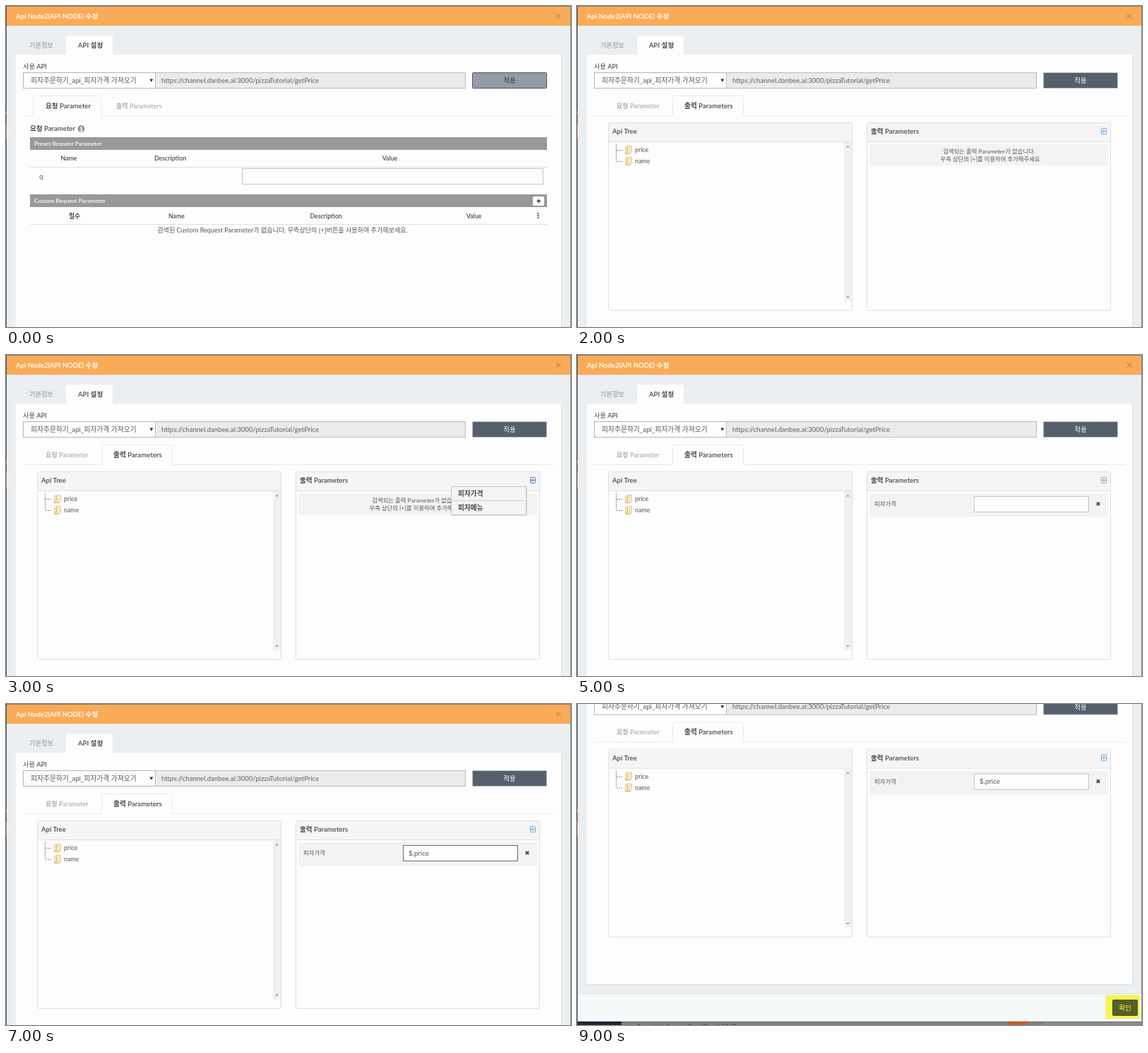
Recreate the animation shown at these times as an HTML page. Size 800 by 455 pixels, loop 10000 ms.

```html
<!DOCTYPE html>
<html lang="ko">
<head>
<meta charset="utf-8">
<title>API 설정</title>
<style>
html, body { margin: 0; width: 100%; height: 100%; overflow: hidden; background: #ebeff1; }
svg { display: block; width: 800px; height: 455px; }
text { font-family: Lato, "Noto Sans CJK KR", "Noto Sans CJK JP", sans-serif; white-space: pre; }
</style>
</head>
<body>
<svg id="stage" viewBox="0 0 800 455" xmlns="http://www.w3.org/2000/svg"></svg>
<script>
const LOOP = 10000, STEP = 1000, SCROLL = -101.4;
const INK = '#555', DARK = '#484848', SLATE = '#55606c', MUTED = '#a9afbd', ORANGE = '#f9ab58';

// Shape helpers: boxes are given by their edges
const box = (x1, y1, x2, y2, fill, more = '') =>
  `<rect x="${x1}" y="${y1}" width="${x2 - x1}" height="${y2 - y1}" fill="${fill}" ${more}/>`;
const frame = (x1, y1, x2, y2, fill, stroke, r = 0) =>
  box(x1 + .5, y1 + .5, x2 - .5, y2 - .5, fill, `stroke="${stroke}" rx="${r}"`);
const path = (d, stroke, more = '') => `<path d="${d}" fill="none" stroke="${stroke}" ${more}/>`;
const text = (x, y, s, size, fill = INK, more = '') =>
  `<text x="${x}" y="${y}" font-size="${size}" fill="${fill}" ${more}>${s}</text>`;
const bold = (x, y, s, size, fill = DARK, more = '') =>
  text(x, y, s, size, fill, `font-weight="600" ${more}`);
const MID = 'text-anchor="middle"';
const head = (x, y, s) => bold(x, y, s, 8.8, DARK, MID);

// A part is visible during the steps from a up to, but not including, b
const part = (a, b, ...shapes) => `<g data-from="${a}" data-to="${b}">${shapes.join('')}</g>`;

const cross = (x, y, r, color, w) =>
  path(`M${x - r} ${y - r}L${x + r} ${y + r}M${x + r} ${y - r}L${x - r} ${y + r}`, color, `stroke-width="${w}"`);

const plusIcon = color =>
  frame(742, 173, 750, 182, '#fafcff', color, 1) +
  path('M743.5 177.5H748.5M746 175V180', color);

const applyButton = (fill, border, ink) =>
  frame(660, 94, 766, 117, fill, border, 1) + text(713, 109, '적용', 9.4, ink, MID);

const tab = (x1, x2) =>
  path(`M${x1 + .5} 156V129.500Q${x1 + .5} 127.500 ${x1 + 2.5} 127.500H${x2 - 2.5}Q${x2 - .5} 127.500 ${x2 - .5} 129.500V156`,
    '#e9ebed', 'style="fill:#fdfdfd"');

const card = (x1, x2, title) =>
  frame(x1, 165, x2, 432, '#fdfdfd', '#dfdfdf', 2) +
  box(x1 + 1, 166, x2 - 1, 192, '#f5f5f5') +
  path(`M${x1} 192.500H${x2}`, '#dfdfdf') +
  bold(x1 + 6, 181.3, title, 9.6);

const node = (y, label) =>
  path(`M56 ${y + .5}H64`, '#8d8d8d', 'stroke-dasharray="2 1"') +
  `<path d="M68.500 ${y - 4}L71 ${y - 5.5}H77.500V${y + 3}L75 ${y + 5.5}H68.500Z" fill="#f8e9c2" stroke="#dcc08a" stroke-width=".8"/>` +
  path(`M71.500 ${y - 4}V${y + 2}L69 ${y + 5}H75.500`, '#d3a95f', 'stroke-width=".8"') +
  text(82, y + 3, label, 8.9);

const emptyRow =
  box(414, 196, 752, 226.5, '#f3f3f3', 'rx="2"') +
  text(583.5, 208.7, '검색되는 출력 Parameter가 없습니다.', 8.33, INK, MID) +
  text(585, 220.2, '우측 상단의 [+]를 이용하여 추가해주세요', 8.33, INK, MID);

const menu = active =>
  box(631, 188, 738, 228, '#000', 'opacity=".1"') +
  frame(630, 186, 737, 227, '#f4f4f4', '#c4c4c4') +
  path('M631 206.500H736', '#cfcfcf') +
  (active ? box(630, 186, 737, 207, ORANGE) : '') +
  bold(640, 200, '피자가격', 9.7, active ? '#fff' : DARK) +
  bold(640, 220.3, '피자메뉴', 9.7);

const valueInput = border => frame(334, 230, 761, 253, '#fdfdfd', border);
const paramInput = (value, border) =>
  frame(562, 200, 725, 223, '#fdfdfd', border) + text(570, 214.6, value, 9.7);

const requestTab = [
  tab(38, 135),
  bold(56, 144.8, '요청 Parameter', 9.6),
  bold(156, 144.6, '출력 Parameters', 9.1, MUTED),
  bold(34, 177.3, '요청 Parameter', 9.6),
  '<circle cx="106.5" cy="174" r="5" fill="#999"/>',
  path('M105.3 173H107V177M105 177H108.500M106 170.800H107.500', '#fff', 'stroke-width="1.3"'),
  box(34, 186, 766, 204, '#999'),
  bold(40, 198.2, 'Preset Request Parameter', 8.35, '#fff'),
  head(89, 219.2, 'Name'), head(232.5, 219.2, 'Description'), head(543.5, 219.2, 'Value'),
  path('M34 228.500H766', '#dedede'),
  text(47, 244.8, 'q', 9.5),
  part(0, 1, valueInput('#c6c6c6')),
  part(1, 2, valueInput(SLATE),
    text(343, 244.6, '#{피자메뉴}', 9.55), path('M379.500 235.500V247', '#555')),
  box(34, 267, 766, 285, '#999'),
  bold(40, 279.2, 'Custom Request Parameter', 8.35, '#fff'),
  box(746, 270, 762, 283, '#fff', 'rx="1.500"'),
  path('M751.500 276.500H757M754.250 273.800V279.300', '#333', 'stroke-width="1.500"'),
  head(97, 300.5, '필수'), head(241.5, 300.5, 'Name'),
  head(453, 300.5, 'Description'), head(662.5, 300.5, 'Value'),
  ...[294, 297, 300].map(y => box(752.5, y - .8, 754.5, y + 1, '#444')),
  path('M34 309.500H766', '#dedede'),
  text(391.5, 321.2, '검색된 Custom Request Parameter가 없습니다. 우측상단의 [+]버튼을 사용하여 추가해보세요.', 9.07, INK, MID)
];

const outputTab = [
  tab(135, 236),
  bold(56, 144.6, '요청 Parameter', 9.1, MUTED),
  bold(152, 144.8, '출력 Parameters', 9.7),
  card(44, 390, 'Api Tree'),
  box(378, 193, 389, 418.5, '#eef1f1'),
  '<path d="M381 200.500H386L383.500 197.500ZM381 411.500H386L383.500 414.500Z" fill="#a0a3a3"/>',
  path('M55.500 196V220', '#8d8d8d', 'stroke-dasharray="2 1"'),
  part(6, 7, frame(64, 196, 104, 212, '#e7f4f9', '#cccccc', 1)),
  node(204, 'price'), node(220, 'name'),
  card(410, 756, '출력 Parameters'),
  part(2, 3, plusIcon('#6a9fd4')),
  part(3, 4, plusIcon('#3f74aa')),
  part(4, 5, plusIcon('#5a92cb')),
  part(5, 10, plusIcon('#6a9fd4')),
  part(2, 5, emptyRow),
  part(3, 4, menu(false)),
  part(4, 5, menu(true)),
  part(5, 10, box(414, 196, 752, 229.5, '#f3f3f3', 'rx="2"'),
    text(421, 214.4, '피자가격', 8.4), cross(738, 211, 2.2, '#3c3c3c', 1.8)),
  part(5, 7, paramInput('', '#c4c4c4')),
  part(7, 8, paramInput('$.price', '#6a6a6a')),
  part(8, 10, paramInput('$.price', '#c4c4c4'))
];

const page = [
  box(13, 70, 787, 499.5, '#000', 'opacity=".07"'),
  box(13.5, 69, 786, 498.5, '#fdfdfd'),
  box(85, 42, 151, 70, '#fdfdfd', 'rx="2"'),
  bold(33, 58.6, '기본정보', 9.2, MUTED),
  bold(102, 58.8, 'API 설정', 9.6),
  text(24, 88.6, '사용 API', 9.2, DARK, 'font-weight="500"'),
  frame(24, 94, 212, 117, '#fdfdfd', '#b4b4b4'),
  text(35, 108.8, '피자주문하기_api_피자가격 가져오기', 9.75),
  '<path d="M203.300 103.500H208.300L205.800 107.700Z" fill="#333"/>',
  frame(211, 94, 651, 117, '#ebebeb', '#bcbcbc'),
  text(220, 108.6, 'https://channel.danbee.ai:3000/pizzaTutorial/getPrice', 9.57, '#5f5f5f'),
  part(0, 1, applyButton('#949ba6', '#4b5561', '#333')),
  part(1, 10, applyButton(SLATE, '#b9bfca', '#fff')),
  path('M24 155.500H776', '#e9ebed'),
  part(0, 2, ...requestTab),
  part(2, 10, ...outputTab)
];

const header = part(0, 8,
  box(0, 0, 800, 28, ORANGE),
  box(0, 0, 800, 1, '#8d7a66'),
  bold(14, 17.8, 'Api Node2(API NODE) 수정', 9.6, '#fff'),
  cross(782, 14.3, 3.4, '#a67b4c', 1));

const footer = part(8, 10,
  box(0, 410, 800, 450, '#f6f9fa'),
  path('M0 410.500H800', '#dfe3e5'),
  frame(758, 419, 794, 442, SLATE, '#47515c', 1),
  text(776, 433.8, '확인', 9.6, '#fff', MID),
  box(0, 450, 661, 455, '#7f8182'),
  box(661, 450, 800, 455, '#8b8c8d'),
  box(0, 450, 63, 455, '#1f2935'),
  '<clipPath id="below"><rect y="450" width="800" height="5"/></clipPath>',
  '<circle cx="625" cy="431" r="26" fill="#d05c28" clip-path="url(#below)"/>',
  text(84, 461, 'Copyright Sample Page(Feed) 2017', 9.2, '#333'),
  box(0, 450, 800, 451, '#000', 'opacity=".2"'));

const highlight = part(9, 10,
  box(748.5, 412.5, 797, 446, '#fdfb55', 'style="mix-blend-mode:multiply"'));

const edges =
  box(0, 0, 1, 455, '#4a525b') + box(799, 0, 800, 455, '#85888a') +
  box(0, 149, 1, 154, '#b88354') + box(0, 167, 1, 188, '#b88354');

const stage = document.getElementById('stage');
stage.innerHTML = box(0, 0, 800, 455, '#ebeff1') +
  `<g id="page">${page.join('')}</g>` + header + footer + highlight + edges;

const scroller = document.getElementById('page');
const parts = [...stage.querySelectorAll('[data-from]')].map(el =>
  ({ el, from: +el.dataset.from, to: +el.dataset.to }));

function render(ms) {
  const step = Math.floor((ms % LOOP) / STEP);
  for (const { el, from, to } of parts)
    el.style.display = step >= from && step < to ? '' : 'none';
  scroller.setAttribute('transform', `translate(0 ${step >= 8 ? SCROLL : 0})`);
}

const start = performance.now();
function tick() {
  render(performance.now() - start);
  requestAnimationFrame(tick);
}
tick();
</script>
</body>
</html>
```
